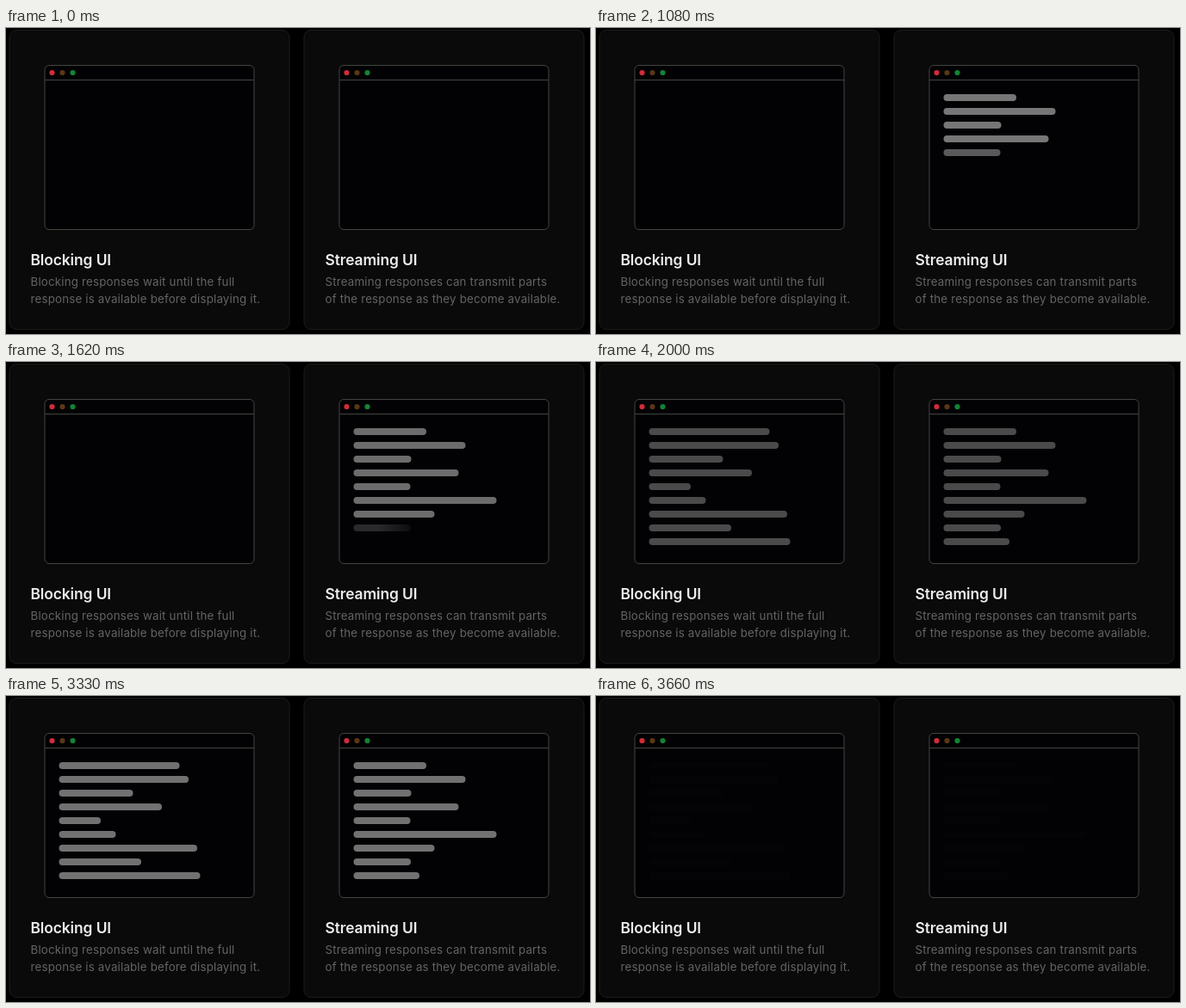
Write an HTML page that moves like this. It is 678 by 356 pixels and loops after 3.79 s.

```html
<!DOCTYPE html>
<html lang="en">
<head>
<meta charset="utf-8">
<title>Blocking and streaming UI</title>
<style>
  html, body { margin: 0; width: 100%; height: 100%; overflow: hidden; background: #000; }
  svg { display: block; width: 678px; height: 356px; font-family: Inter, sans-serif; }
  .card { fill: #0a0a0a; stroke: #1b1c1a; }
  .window { fill: #020204; stroke: #424442; }
  .title { fill: #ededed; font-size: 17.4px; font-weight: 600; letter-spacing: -.006em; }
  .text { fill: #646464; font-size: 13.3px; letter-spacing: .0145em; }
  .bars { fill: #7c7c7c; }
</style>
</head>
<body>
<svg viewBox="0 0 678 356">
  <defs>
    <g id="frame">
      <rect class="card" x="4" y="2.5" width="325" height="348" rx="8"/>
      <rect class="window" x="45" y="43.5" width="243" height="191" rx="5"/>
      <path class="window" d="M45 60.5H288"/>
      <circle cx="53.5" cy="52" r="3.1" fill="#d02c38"/>
      <circle cx="65.5" cy="52" r="3.1" fill="#5a3814"/>
      <circle cx="77.5" cy="52" r="3.1" fill="#128436"/>
    </g>
  </defs>
  <g>
    <use href="#frame"/>
    <g class="bars" id="blocking"></g>
    <text class="title" x="28.5" y="276">Blocking UI</text>
    <text class="text" x="28.5" y="300">Blocking responses wait until the full</text>
    <text class="text" x="28.5" y="320">response is available before displaying it.</text>
  </g>
  <g transform="translate(342)">
    <use href="#frame"/>
    <g class="bars" id="streaming"></g>
    <text class="title" x="28.5" y="276">Streaming UI</text>
    <text class="text" x="28.5" y="300">Streaming responses can transmit parts</text>
    <text class="text" x="28.5" y="320">of the response as they become available.</text>
  </g>
</svg>
<script>
const LOOP = 3790;
const ROW_START = 60, ROW_STEP = 210, ROW_FADE = 240, SWEEP = 132, SOFT = 0.75;
const blocking = document.getElementById('blocking');
const streaming = document.getElementById('streaming');

const ramp = (t, start, length) => Math.min(1, Math.max(0, (t - start) / length));

const bar = (width, row, extra = '') =>
  `<rect x="61.5" y="${77 + row * 16}" width="${width}" height="8" rx="4" ${extra}/>`;

const sweep = row => `<linearGradient id="sweep${row}">
  <stop stop-color="#7c7c7c"/>
  <stop offset="1" stop-color="#7c7c7c" stop-opacity="0"/>
</linearGradient>`;

blocking.innerHTML = [140, 150.5, 86, 119.5, 48.5, 66, 160.5, 95.5, 164]
  .map((w, i) => bar(w, i)).join('');
streaming.innerHTML = [84.5, 130, 67, 122, 66, 166, 94, 66.5, 76.5]
  .map((w, i) => sweep(i) + bar(w, i, `fill="url(#sweep${i})"`)).join('');

const gradients = [...streaming.querySelectorAll('linearGradient')];
const rows = [...streaming.querySelectorAll('rect')];

function render(t) {
  const pulse = 0.75 + 0.25 * Math.cos((t - 1280) / 1000 * Math.PI);
  const level = pulse * (1 - ramp(t, 3297, 370));
  blocking.setAttribute('opacity', level * ramp(t, 1750, 200));
  streaming.setAttribute('opacity', level);
  rows.forEach((row, i) => {
    const start = ROW_START + i * ROW_STEP;
    const edge = -SOFT + (1 + SOFT) * ramp(t, start, SWEEP);
    row.setAttribute('opacity', ramp(t, start, ROW_FADE));
    gradients[i].setAttribute('x1', edge);
    gradients[i].setAttribute('x2', edge + SOFT);
  });
}

let origin;
function tick(now) {
  origin ??= now;
  render((now - origin) % LOOP);
  requestAnimationFrame(tick);
}
render(0);
requestAnimationFrame(tick);
</script>
</body>
</html>
```
